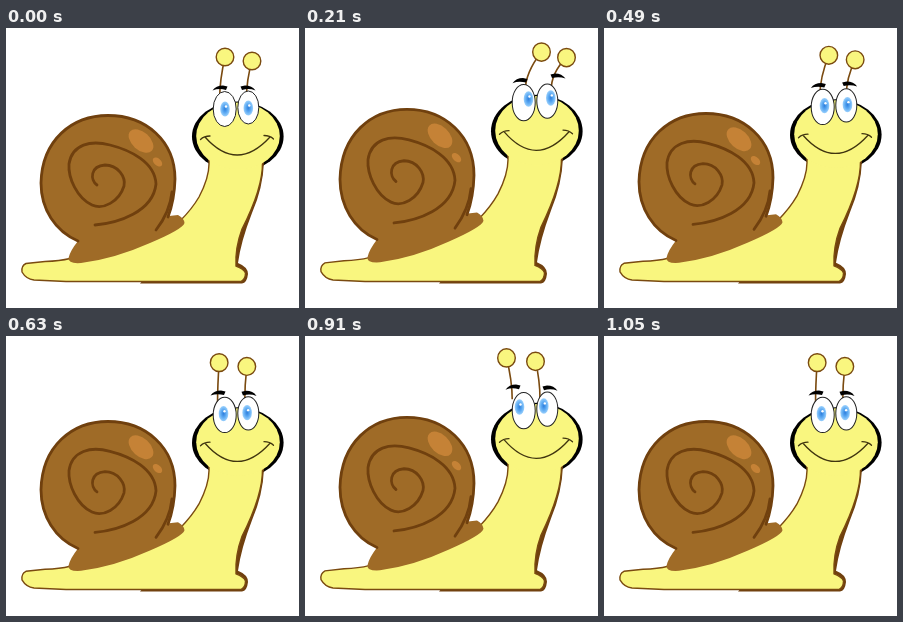
Write an HTML page that moves like this. It is 293 px wide and 280 px high and loops after 1.12 s.

```html
<!DOCTYPE html>
<html lang="en">
<head>
<meta charset="utf-8">
<title>Snail</title>
<style>
  html, body { margin: 0; width: 100%; height: 100%; overflow: hidden; background: #fff; }
  svg { display: block; width: 293px; height: 280px; }
  .skin { fill: #f9f67f; stroke: #7a4a10; stroke-width: 1.4; }
  .dark { fill: #70400e; }
  .line { fill: none; stroke: #70400e; stroke-width: 2.8; stroke-linecap: round; }
  .shell { fill: #9f6b27; }
  .shine { fill: #c58236; }
  .eye { fill: #fff; stroke: #222; }
  .stalk { fill: none; stroke: #7a4a10; stroke-width: 1.6; }
  .smile { fill: none; stroke: #40350f; stroke-width: 1.3; stroke-linecap: round; }
</style>
</head>
<body>
<svg viewBox="0 0 293 280">
  <defs>
    <radialGradient id="iris">
      <stop offset="0" stop-color="#2f7fdc"/>
      <stop offset=".5" stop-color="#5aa8f2"/>
      <stop offset="1" stop-color="#9ad0fc"/>
    </radialGradient>
    <path id="brow" d="M-7.500 2.500 Q-4 -2.500 3 -2.500 L7.500 -1.500 L6 2 Q-1 0 -7.500 2.500Z"/>
  </defs>

  <g id="snail">
    <ellipse cx="231.800" cy="108.500" rx="45.800" ry="35"/>
    <path class="dark" d="M258 134 Q257 160 246 185 Q235 213 232 235 Q242 239 242 246 Q241 255 236 255.500 H134 L220 160Z"/>
    <path class="skin" d="M203 112 V136 Q203 150 193 169 Q186 181 174 193 L64 230.500
      Q54 233 39 233.500 L20 235.500 Q15 238 16 244 Q20 251 28 252 L60 253.500 H235
      Q239.500 251 239.500 245 Q238 241 230 238 Q229 220 236 201 Q257 160 256.500 134 V112Z"/>

    <path class="shell" d="M72 213 C49 203 34 181 34.500 155 C36 112 66 87 102 87
      C140 87 169.500 113 169.500 151 Q169 172 163 188 L172 187 Q178 190 178.500 195
      Q177 201 144 215 Q108 231 75 235 Q62 236 62.500 230 Q64 223 72 213Z"/>
    <path class="line" d="M72 213 C49 203 35 181 35 155 C36 112 66 87.500 102 87.500
      C140 87.500 169 113 169 151 Q168.500 172 162 189"/>
    <path class="line" d="M91 157 C84 152 84 138 99 137 C112 137 120 149 118 158
      C113 174 97 182 86 177 C71 170 62 150 63 136 C66 116 85 112 104 117
      C124 122 149 134 150 156 C147 184 112 195 89 197 M166 164 Q164 184 150 202"/>
    <ellipse class="shine" cx="135" cy="113" rx="14.500" ry="9" transform="rotate(42 135 113)"/>
    <ellipse class="shine" cx="151.500" cy="134" rx="5.500" ry="3.500" transform="rotate(42 151.500 134)"/>

    <ellipse cx="232" cy="108" rx="41.800" ry="33.500" fill="#f9f67f"/>
    <g id="stalks"></g>
    <g id="brows"></g>
    <ellipse class="eye" cx="242.300" cy="79.500" rx="10.500" ry="16.500"/>
    <ellipse class="eye" cx="218.700" cy="81" rx="11.500" ry="17.500"/>
    <g id="irises"></g>
    <path class="smile" d="M194.500 111.500 Q198 108 204 108 M199 109 Q231 145 264 109 M258 107.500 Q264 107.500 267.500 111"/>
  </g>
</svg>
<script>
const STEP = 70, STEPS = 16, GROUND = 253;
const $ = id => document.getElementById(id);

// Sideways lean: a triangle wave clipped to -1..1, so it holds briefly at each end
function lean(step) {
  const wave = 4 - Math.abs((step + 4) % STEPS - 8);
  return Math.max(-1, Math.min(1, wave / 3));
}

const stalk = (x, y, baseX) =>
  `<path class="stalk" d="M${baseX} 70 Q${baseX} 52 ${x} ${y}"/>
   <circle class="skin" cx="${x}" cy="${y}" r="8.8"/>`;

const brow = (x, y, flip) =>
  `<use href="#brow" transform="translate(${x} ${y}) scale(${flip} 1)"/>`;

const iris = (x, y) =>
  `<ellipse cx="${x}" cy="${y}" rx="4.8" ry="7.5" fill="url(#iris)"/>
   <circle cx="${x + 1}" cy="${y - 2.5}" r="1.2" fill="#fff"/>`;

function draw(u) {
  const a = Math.abs(u);
  // The whole body stretches up from the ground as it leans
  $('snail').setAttribute('transform',
    `translate(0 ${GROUND}) scale(1 ${1 + 0.037 * a}) translate(0 ${-GROUND})`);
  $('stalks').innerHTML =
    stalk(219 + 17.5 * u, 29 + 2.2 * a + u, 213.7 + 6.5 * u) +
    stalk(246 + 15.5 * u, 33 + 2.5 * a + 2 * u, 240.5 + 5.5 * u);
  $('brows').innerHTML =
    brow(214 + (u > 0 ? 1 : 6) * u, 60 - a + 0.7 * u, 1) +
    brow(242 + (u > 0 ? 11 : -3) * u, 60 - 2.7 * a - 2 * u, -1);
  $('irises').innerHTML =
    iris(219 + 4.5 * u, 81 - 3.5 * a) + iris(242.3 + 3.5 * u, 80 - 3.5 * a);
}

function tick() {
  draw(lean(Math.floor(performance.now() / STEP) % STEPS));
  requestAnimationFrame(tick);
}
tick();
</script>
</body>
</html>
```
